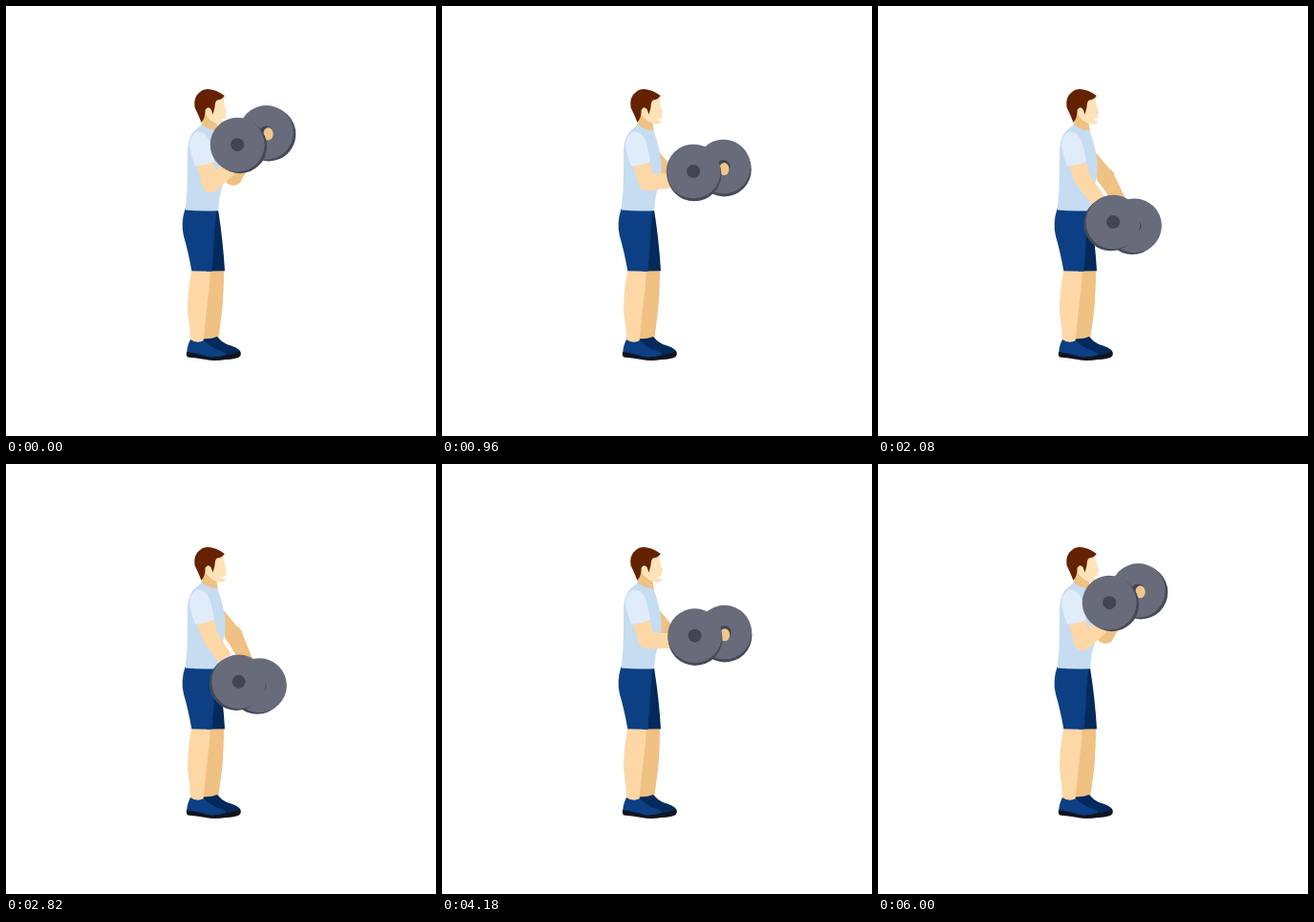
These frames come from a looping animation (450 px wide and 450 px high, 6320 ms). An HTML page with a canvas:

```html
<!DOCTYPE html>
<html lang="en">
<head>
<meta charset="utf-8">
<title>Dumbbell curl</title>
<style>
html, body { margin: 0; width: 100%; height: 100%; overflow: hidden; background: #fff; }
canvas { display: block; width: 450px; height: 450px; }
</style>
</head>
<body>
<canvas id="stage"></canvas>
<script>
const LOOP = 6320;
const canvas = document.getElementById('stage');
const ctx = canvas.getContext('2d');
const ratio = window.devicePixelRatio || 1;
canvas.width = canvas.height = 450 * ratio;
ctx.scale(ratio, ratio);

const SKIN = '#fdd8a6', SKIN_DARK = '#efc183', FACE = '#fee2b8';
const SHIRT = '#c6dcf1', SLEEVE = '#e1ecfb';
const BLUE = '#0c3f84', BLUE_DARK = '#042a5c';
const PLATE = '#676b7a', RIM = '#454958', HUB = '#414550';
const SOLE = '#11151f';

// Arm keys: time in ms, angle in degrees, speed in degrees per ms.
const KEYS = [
  [0, -57.5, 0], [960, -16.3, 0.072], [2080, 52, 0.0275], [2380, 55.8, 0],
  [2740, 55.8, 0], [3340, 39.4, -0.052], [4180, -8.5, -0.06],
  [4780, -44.8, -0.046], [5520, -57.5, 0], [LOOP, -57.5, 0]
];

function armAngle(time) {
  const i = KEYS.findIndex((key, n) => n > 0 && time <= key[0]);
  const [t0, a0, v0] = KEYS[i - 1], [t1, a1, v1] = KEYS[i];
  const span = t1 - t0, u = (time - t0) / span;
  const blend = u * u * (3 - 2 * u);
  return a0 + (a1 - a0) * blend
    + span * u * (1 - u) * (v0 * (1 - u) - v1 * u);
}

// The motion advances in 40 ms steps and rests briefly every 700 ms.
function steppedTime(time) {
  const phase = (time + 20) % 700;
  return Math.max(0, time - phase + Math.min(600, Math.floor(phase / 40) * 40));
}

const rad = degrees => degrees * Math.PI / 180;
const polar = (x, y, r, degrees) =>
  [x + r * Math.cos(rad(degrees)), y + r * Math.sin(rad(degrees))];

function shape(color, path) {
  ctx.fillStyle = color;
  ctx.fill(new Path2D(path));
}

function disc(x, y, r, color) {
  ctx.fillStyle = color;
  ctx.beginPath();
  ctx.arc(x, y, r, 0, Math.PI * 2);
  ctx.fill();
}

function limb([x0, y0], r0, [x1, y1], r1, color) {
  const a = Math.atan2(y1 - y0, x1 - x0);
  const nx = -Math.sin(a), ny = Math.cos(a);
  ctx.fillStyle = color;
  ctx.beginPath();
  ctx.moveTo(x0 + nx * r0, y0 + ny * r0);
  ctx.lineTo(x1 + nx * r1, y1 + ny * r1);
  ctx.lineTo(x1 - nx * r1, y1 - ny * r1);
  ctx.lineTo(x0 - nx * r0, y0 - ny * r0);
  ctx.fill();
}

function plate(x, y, angle) {
  const [rx, ry] = polar(x, y, 3, angle + 90);
  disc(rx, ry, 28.4, RIM);
  disc(x, y, 28.4, PLATE);
  disc(x, y, 7, HUB);
}

function legs() {
  shape(SKIN_DARK, 'M207 275H228Q228 300 226 320L222 350H205Z');
  shape(BLUE_DARK, 'M205 348Q214 349 221 346Q225 351 231 354Q243 357 245.5 362L245 366L216 367Z');
  shape(SOLE, 'M218 366Q234 366 245 361.5Q247 366 243 368Q233 371 218 370Z');
  shape(SKIN, 'M194.5 275H214Q213 298 209.5 320L206.5 352H193Q193 338 190.3 322Q189 304 194.5 275Z');
  shape(BLUE, 'M193 349Q200 354 207 350Q212 355 219 359Q231 362 232 367L212 368L189.5 364Q188.5 358 193 349Z');
  shape(SOLE, 'M189 362Q202 364 211 367Q223 368 232 364.5Q233 369 229 370Q218 372 209 370Q199 368 190 367.5Q188 365 189 362Z');
  shape(BLUE_DARK, 'M206 212H221.8Q227 244 229 277.2L210 277.5Z');
  shape(BLUE, 'M187.5 212H220.5Q218 232 217.5 252L215.5 277.8L194.3 277.2Q190.5 256 186 241Q182.5 228 187.5 212Z');
}

function head() {
  shape(SKIN_DARK, 'M206 110L219 112L222 132L214 133Q206 130 204 125Q207 119 206 110Z');
  shape(FACE, 'M208 102L227 95Q228.5 102 229 106L231.5 111.5L229.8 113L230 118L229 123Q224 125 218 122Q212 119 208 112Z');
  shape('#fff', 'M225 118.5L230 117.2L229.5 119.7Q227 120.5 225 118.5Z');
  shape('#652200', 'M204.5 122Q201 113 197.5 106Q196 95 203 90Q208 85 217 88Q222 89 228.8 94Q226 98 221 98.5Q218.5 100 218.5 106L216.5 113.5L214.5 108Q211 104 208.5 109Q209 116 204.5 122Z');
}

function farArm(angle) {
  const elbow = [238, 178.5];
  const pivot = [236, 179.8];
  const turn = angle + 5;
  const [x, y] = polar(...pivot, 59.7, turn);
  plate(x, y, angle);
  limb([224, 156.5], 5, elbow, 8.5, SKIN_DARK);
  disc(...elbow, 9.4, SKIN_DARK);
  limb(elbow, 9, polar(...pivot, 50, turn), 5, SKIN_DARK);
  const [hx, hy] = polar(x, y, 2.6, angle + 90);
  ctx.fillStyle = '#f1c68c';
  ctx.beginPath();
  ctx.ellipse(hx, hy, 5.2, 6.6, 0, 0, Math.PI * 2);
  ctx.fill();
}

function torso() {
  shape(SHIRT, 'M205 124Q212 130 221 130Q225 139 227 149Q231 164 229 178Q226 191 223.5 200L222 214.3Q204 215 187.5 213.5Q190 195 190 176L190 150Q191 135 199 129Z');
}

function nearArm(angle) {
  const elbow = [214, 184 - angle * 0.05];
  limb([207, 159], 9, elbow, 8.5, SKIN);
  disc(...elbow, 8.5, SKIN);
  limb(elbow, 8.5, polar(...elbow, 27, 9 + angle * 0.85), 7.8, SKIN);
  shape(SLEEVE, 'M199 132Q207 130 212 139Q216 149 218 162.5Q209 167 198 167.5Q193 155 192 145Q193 135 199 132Z');
  plate(...polar(215.5, 187, 49.6, angle), angle);
}

function draw(time) {
  const angle = armAngle(steppedTime(time));
  ctx.fillStyle = '#fff';
  ctx.fillRect(0, 0, 450, 450);
  legs();
  head();
  farArm(angle);
  torso();
  nearArm(angle);
}

const start = performance.now();
function tick() {
  draw((performance.now() - start) % LOOP);
  requestAnimationFrame(tick);
}
tick();
</script>
</body>
</html>
```
